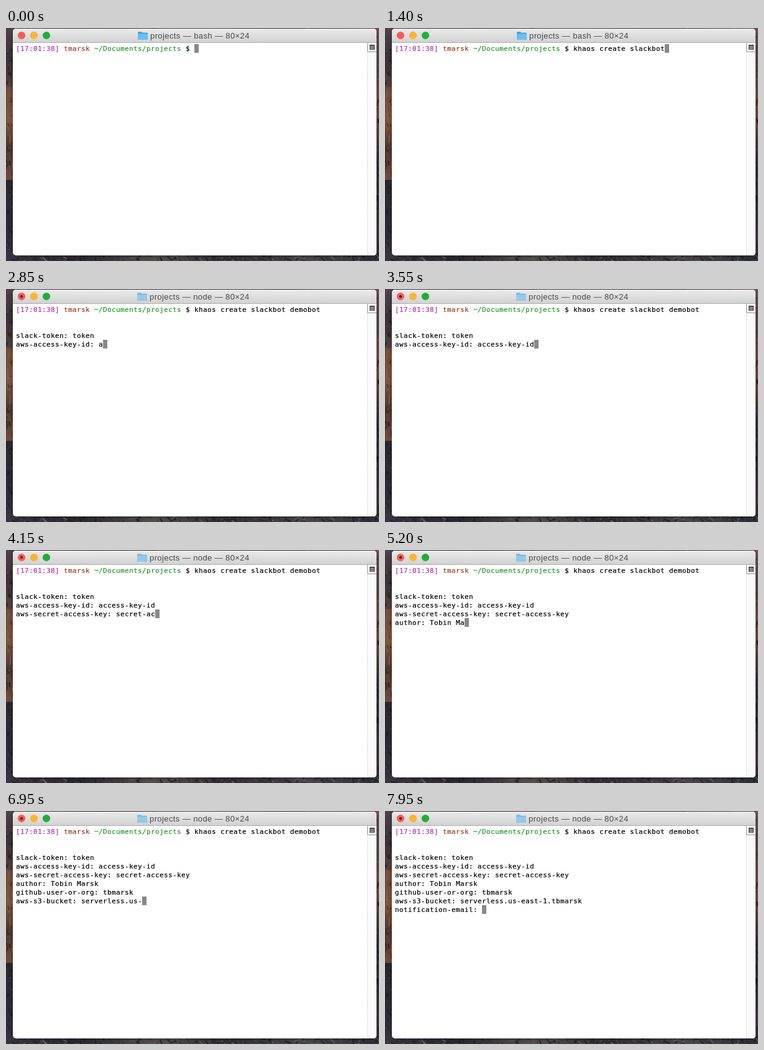
Animation, 600 px wide and 376 px high, one loop 8 s. Source, as an HTML page with a canvas:

```html
<!DOCTYPE html>
<html lang="en">
<head>
<meta charset="utf-8">
<title>Terminal session</title>
<style>
  html, body { margin: 0; width: 600px; height: 376px; overflow: hidden; background: #2b262b; }
  body { position: relative; }
  #wall { position: absolute; left: 0; top: 0; }
  #win {
    position: absolute; left: 11px; top: 0; width: 585px; height: 367px;
    background: #fff; clip-path: inset(1px 0 0 round 5px);
  }
  #shadow {
    position: absolute; left: 11px; top: 1px; width: 585px; height: 366px;
    border-radius: 5px; box-shadow: 0 2px 5px rgba(0, 0, 0, .35);
  }
  #bar {
    position: absolute; left: 0; top: 0; width: 100%; height: 23px;
    background: linear-gradient(#ececec, #d2d2d2); border-bottom: 1px solid #adadad;
  }
  #bar svg { position: absolute; left: 0; top: 0; }
  #title {
    position: absolute; left: 221px; top: 5px; white-space: pre; color: #484848;
    font: 13px/16px "Liberation Sans", Arial, sans-serif; letter-spacing: .4px;
  }
  #dot { visibility: hidden; }
  .node #dot { visibility: visible; }
  .node #title { left: 220px; }
  .node #folder { transform: translateX(-1px); opacity: .62; }
  #scroll {
    position: absolute; left: 570px; top: 24px; width: 14px; bottom: 0;
    background: #fafafa; border-left: 1px dotted #cfcfcf;
  }
  #split { position: absolute; left: 570px; top: 24px; }
  #term {
    position: absolute; left: 5px; top: 27px; margin: 0; color: #000;
    font: 11px/14px "DejaVu Sans Mono", Menlo, monospace;
    -webkit-text-stroke: .2px;
  }
  #cursor {
    display: inline-block; position: relative; top: -1px; width: 7px; height: 14px;
    vertical-align: top; background: #888;
  }
  .time { color: #b030b6; }
  .user { color: #9c3a1c; }
  .path { color: #1f9627; }
</style>
</head>
<body>
<canvas id="wall" width="600" height="376"></canvas>
<div id="shadow"></div>
<div id="win">
  <div id="bar">
    <svg width="585" height="23">
      <g stroke-width=".5">
        <circle cx="14" cy="12" r="5.8" fill="#fb5b55" stroke="#e2463f"/>
        <circle cx="34" cy="12" r="5.8" fill="#fdb62c" stroke="#e09f24"/>
        <circle cx="54" cy="12" r="5.8" fill="#1fad39" stroke="#159a2c"/>
      </g>
      <circle id="dot" cx="14" cy="12" r="2" fill="#430605"/>
      <g id="folder">
        <path d="M201 7.2q0-1.2 1.2-1.2h4.6l1.5 1.6h7.5q1.2 0 1.2 1.2v9.2q0 1-1 1h-14q-1 0-1-1z" fill="#45a3de"/>
        <path d="M201 9.5h16v8.5q0 1-1 1h-14q-1 0-1-1z" fill="#66c0f3"/>
      </g>
    </svg>
    <div id="title"></div>
  </div>
  <div id="scroll"></div>
  <svg id="split" width="15" height="16">
    <path d="M.5 0V14.5H15" fill="#f2f2f2" stroke="#999"/>
    <rect x="4" y="3" width="8" height="8" fill="#3a3a3a"/>
    <path d="M5 5.5h6M5 7.5h6M5 9.5h6" stroke="#ccc"/>
  </svg>
  <pre id="term"><span class="time">[17:01:38]</span> <span class="user">tmarsk</span> <span class="path">~/Documents/projects</span> $ <span id="text"></span><span id="cursor"></span></pre>
</div>
<script>
const LOOP = 8000, STEP = 50, NODE_AT = 1900, CELL = 7;

// [first character, last character, text]; equal times print at once
const session = [
  [300, 800, 'khaos create '],
  [1050, 1400, 'slackbot'],
  [1450, 1800, ' demobot'],
  [1850, 1850, '\n'],
  [1900, 1900, '\n'],
  [2050, 2050, '\nslack-token: '],
  [2350, 2550, 'token'],
  [2650, 2650, '\naws-access-key-id: '],
  [2850, 3550, 'access-key-id'],
  [3650, 3650, '\naws-secret-access-key: '],
  [3750, 4550, 'secret-access-key'],
  [4600, 4600, '\nauthor: '],
  [4850, 5200, 'Tobin Ma'],
  [5250, 5300, 'rsk'],
  [5500, 5500, '\ngithub-user-or-org: '],
  [5700, 6100, 'tbmarsk'],
  [6250, 6250, '\naws-s3-bucket: '],
  [6350, 6950, 'serverless.us-'],
  [7000, 7150, 'east'],
  [7200, 7200, '-1'],
  [7450, 7800, '.tbmarsk'],
  [7900, 7900, '\nnotification-email: ']
];

const $ = id => document.getElementById(id);
const term = $('term'), text = $('text'), title = $('title'), win = $('win');

function typed(t) {
  return session.map(([from, to, s]) => {
    if (t < from) return '';
    if (t >= to) return s;
    const done = (t - from) / (to - from) * (s.length - 1);
    return s.slice(0, Math.floor(done + 1e-6) + 1);
  }).join('');
}

// Snap the font's advance to whole pixel cells
function fitCells() {
  const probe = document.createElement('span');
  probe.textContent = 'm'.repeat(50);
  term.append(probe);
  const advance = probe.getBoundingClientRect().width / 50;
  probe.remove();
  term.style.letterSpacing = (CELL - advance) + 'px';
}

// Rock-like texture: a gradient along each strip, crossed by slanted streaks
function paintWall() {
  const c = $('wall').getContext('2d');
  let seed = 7;
  const rnd = () => (seed = seed * 16807 % 2147483647) / 2147483647;
  const strip = (x, y, w, h, colors, tones, dx, dy, count) => {
    const g = w > h ? c.createLinearGradient(x, 0, x + w, 0) : c.createLinearGradient(0, y, 0, y + h);
    colors.forEach((col, i) => g.addColorStop(i / (colors.length - 1), col));
    c.save();
    c.beginPath();
    c.rect(x, y, w, h);
    c.clip();
    c.fillStyle = g;
    c.fillRect(x, y, w, h);
    for (let i = 0; i < count; i++) {
      const px = x + rnd() * w, py = y + rnd() * h;
      c.globalAlpha = .3 + rnd() * .5;
      c.strokeStyle = tones[Math.floor(rnd() * tones.length)];
      c.lineWidth = .7 + rnd() * 1.8;
      c.beginPath();
      c.moveTo(px, py);
      c.lineTo(px + dx * (rnd() - .3), py + dy * (rnd() - .3));
      c.stroke();
    }
    c.restore();
  };
  const dark = ['#15131a', '#1f1a20', '#4a4450'];
  const warm = ['#1d1517', '#8d5f45', '#6b4636'];
  strip(0, 0, 600, 6, ['#4a3d46', '#2c2530', '#51434b', '#30292f', '#5b4750'], dark, 16, 3, 130);
  strip(0, 0, 16, 95, ['#4d414a', '#3b3139', '#54403a'], dark, 6, 14, 45);
  strip(0, 95, 16, 150, ['#6d4a39', '#80573f', '#4a352e', '#724d3a'], warm, 5, 24, 75);
  strip(0, 245, 16, 131, ['#2d2830', '#2a2a36', '#35313b'], dark, 6, 16, 60);
  strip(590, 0, 10, 190, ['#6b5058', '#54424a', '#75503f', '#493833'], warm, 5, 18, 60);
  strip(590, 190, 10, 186, ['#3c3440', '#34313e', '#483b40'], dark, 5, 16, 60);
  strip(0, 362, 600, 14, ['#3a3440', '#2b2831', '#56504f', '#302c33', '#4b474d', '#2d3039'],
    ['#121117', '#1e1c23', '#77716f', '#4e4542'], 14, 12, 260);
}

function draw(now) {
  const t = Math.floor(now % LOOP / STEP) * STEP;
  const node = t >= NODE_AT;
  win.classList.toggle('node', node);
  title.textContent = `projects — ${node ? 'node' : 'bash'} — 80×24`;
  text.textContent = typed(t);
}

fitCells();
paintWall();
draw(0);
const start = performance.now();
requestAnimationFrame(function tick() {
  draw(performance.now() - start);
  requestAnimationFrame(tick);
});
</script>
</body>
</html>
```
